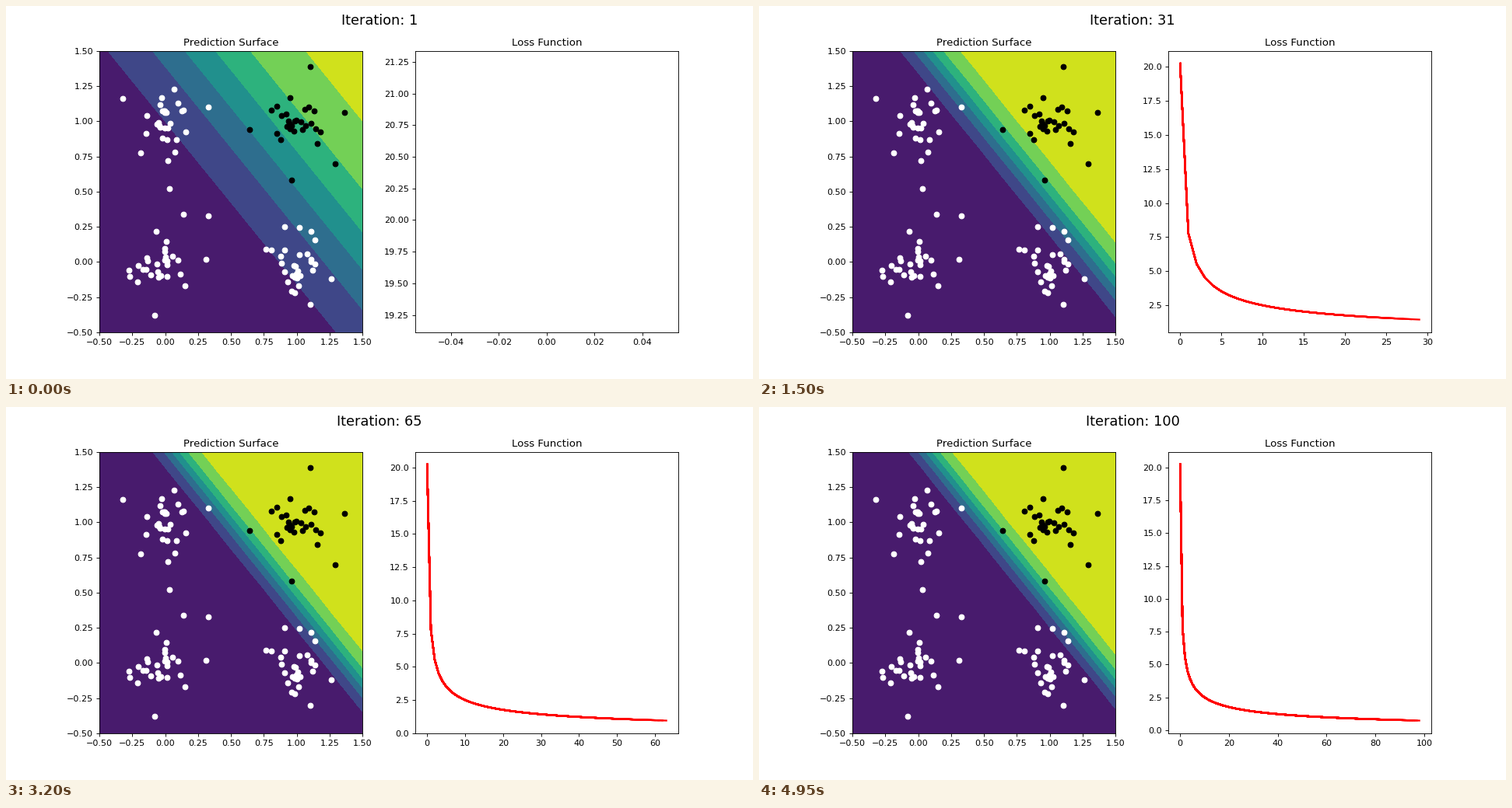
Animation of 960 by 480 pixels, one loop 5 s. Source, as a matplotlib script:

```python
import numpy as np
import matplotlib.pyplot as plt
from matplotlib.animation import FuncAnimation

FRAMES = 100
LEVELS = np.arange(8) * 0.15

# Cluster centres, each with the offsets of its far-out samples.
CLUSTERS = {
    (0, 0): [(-0.08, -0.38), (0.33, 0.33), (0.14, 0.34), (-0.27, -0.1), (0.31, 0.02)],
    (0, 1): [(-0.32, 0.16), (0.07, 0.23), (0.33, 0.1), (0.03, -0.48), (0.02, -0.28)],
    (1, 0): [(-0.09, 0.25), (0.11, 0.22), (0.26, -0.12), (0.1, -0.3), (-0.04, -0.21)],
    (1, 1): [(0.1, 0.39), (-0.36, -0.06), (-0.04, -0.42), (0.29, -0.3), (0.36, 0.06)],
}
SAMPLES = 30

rng = np.random.default_rng(7)


def cluster(center, outliers):
    core = rng.normal(0, 0.11, (SAMPLES - len(outliers), 2))
    return np.array(center) + np.vstack([outliers, core])


def loss_curve():
    """A first high value, then a slowly steepening power law."""
    n = np.arange(1, FRAMES)
    return np.r_[20.225, 7.78 * n ** -(0.49 + 0.00025 * n)]


def surface(n):
    """Logistic model whose boundary sharpens with the iteration n."""
    slope = 2.616 * n ** (0.402 - 0.0155 * np.log(n))
    cross = 0.0625 + 0.00011 * n + 0.165 * np.exp(-(n - 1) / 3)
    ratio = 0.869 - 0.00006 * n
    logit = slope * (gx - cross + ratio * (gy - 1.5))
    return 1 / (1 + np.exp(-logit))


fig, (left, right) = plt.subplots(1, 2, figsize=(12, 6), dpi=80)
fig.subplots_adjust(left=0.125, right=0.9, bottom=0.125, top=0.88, wspace=0.2)
title = fig.suptitle("", fontsize=16)

left.set_title("Prediction Surface")
for center, outliers in CLUSTERS.items():
    color = "black" if center == (1, 1) else "white"
    left.scatter(*cluster(center, outliers).T, c=color, zorder=2)
ticks = np.arange(-2, 7) * 0.25
left.set(xlim=(-0.5, 1.5), ylim=(-0.5, 1.5), xticks=ticks, yticks=ticks)

grid = np.linspace(-0.5, 1.5, 30)
gx, gy = np.meshgrid(grid, grid)
contour = None

# Each step lays one longer line over the earlier ones.
right.set_title("Loss Function")
losses = loss_curve()
lines = [right.plot(losses[:n], color="red", lw=2, visible=False)[0]
         for n in range(1, FRAMES)]


def draw(frame):
    global contour
    title.set_text(f"Iteration: {frame + 1}")
    if contour is not None:
        contour.remove()
    contour = left.contourf(gx, gy, surface(frame + 1), levels=LEVELS, zorder=1)
    for i, line in enumerate(lines):
        line.set_visible(i < max(frame, 1))
    right.relim(visible_only=True)
    right.autoscale_view()


anim = FuncAnimation(fig, draw, frames=FRAMES, interval=50, repeat=True,
                     init_func=lambda: None)
plt.show()
```
